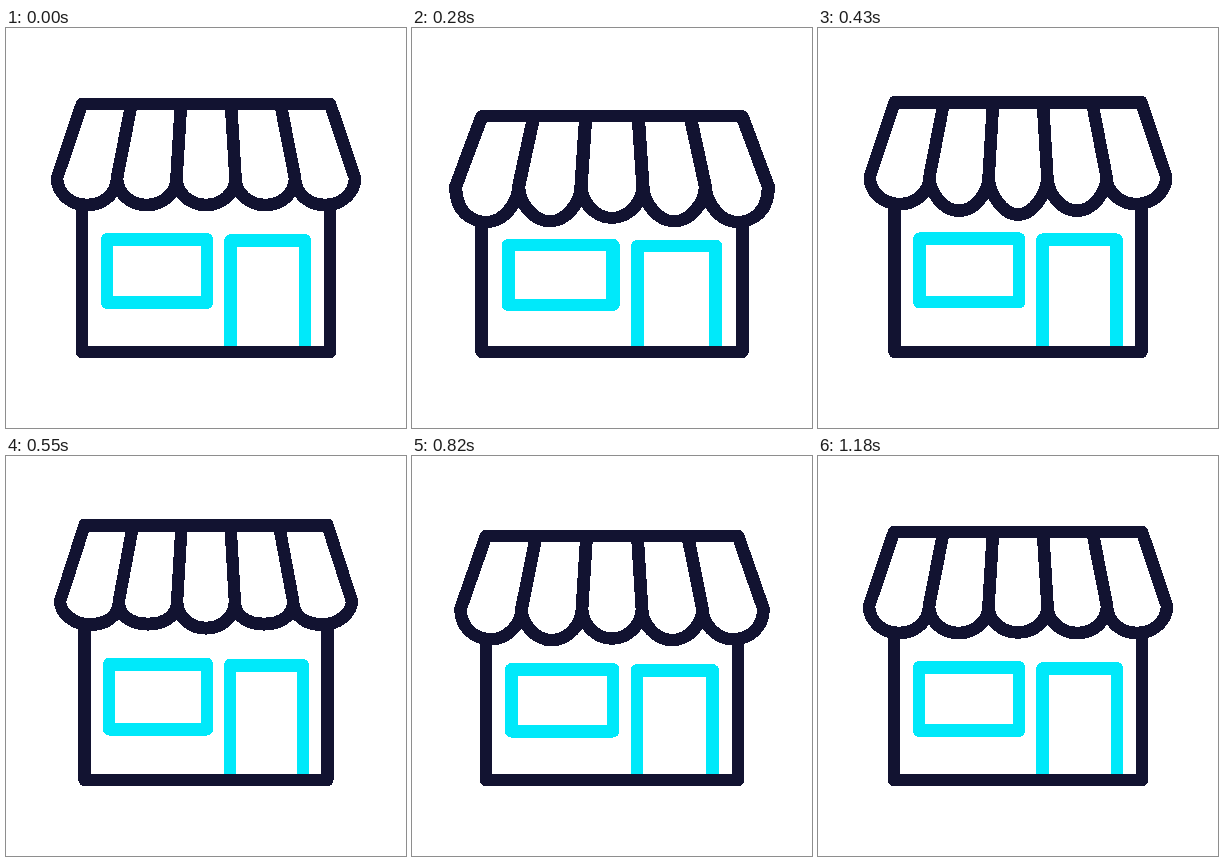
Recreate the animation shown at these times as an HTML page. Size 400x400 px, loop 1.21 s.

```html
<!DOCTYPE html>
<html lang="en">
<head>
<meta charset="utf-8">
<title>Bouncing shop</title>
<style>
  html, body { margin: 0; width: 100%; height: 100%; overflow: hidden; background: #fff; }
  svg { display: block; width: 100%; height: 100%; shape-rendering: crispEdges; }
  path { stroke-width: 12.6; stroke-linejoin: round; fill: none; }
  .navy { stroke: #121331; }
  .cyan { stroke: #00e9fa; }
  #awning { fill: #fff; }
</style>
</head>
<body>
<svg viewBox="0 0 400 400">
  <g id="shop">
    <path class="cyan" d="M101 211.5H201V274.5H101Z"/>
    <path class="cyan" d="M224.5 320V212.5H299V320"/>
    <path class="navy" d="M76 172V324H324V172"/>
    <path class="navy" id="awning"/>
  </g>
</svg>
<script>
  const LOOP = 1210, HOLD = 100, STEP = 30, LAG = 56;
  const GROUND = 324, ROOF = 76, EDGE = 150, HEM = 177, CURVE = 15;

  // Seam positions along the roof and along the lower edge
  const tops = [76, 125.5, 175, 225, 274.5, 324];
  const ends = [51, 111, 170.5, 229.5, 289, 349];

  // [time, value]; positive squash is wider and lower
  const squash = [[80, 0], [255, .051], [525, -.029], [765, .019], [1000, 0]];
  const sag = [[80, 0], [230, 9.5], [310, 10.5], [505, -4.8], [780, 4.8], [945, -2.2], [1130, 0]];

  const shop = document.getElementById('shop');
  const awning = document.getElementById('awning');

  function sample(keys, t) {
    if (t <= keys[0][0]) return keys[0][1];
    for (let i = 1; i < keys.length; i++) {
      const [t0, a] = keys[i - 1], [t1, b] = keys[i];
      if (t < t1) return a + (b - a) * (1 - Math.cos(Math.PI * (t - t0) / (t1 - t0))) / 2;
    }
    return keys[keys.length - 1][1];
  }

  // The free outer sides of the awning bulge along with the sag
  function stripe(i, drop) {
    const l = ends[i], r = ends[i + 1], mid = (l + r) / 2;
    const h = (r - l) * .276, low = HEM + drop;
    const left = EDGE + CURVE + (i === 0 ? drop : 0);
    const right = EDGE + CURVE + (i === 4 ? drop : 0);
    return `M${tops[i]} ${ROOF}L${l} ${EDGE}` +
      `C${l} ${left} ${mid - h} ${low} ${mid} ${low}` +
      `S${r} ${right} ${r} ${EDGE}L${tops[i + 1]} ${ROOF}Z`;
  }

  function draw(t) {
    const s = sample(squash, t);
    const sx = 1 + (s < 0 ? s * .75 : s), sy = 1 - s;
    shop.setAttribute('transform',
      `translate(200 ${GROUND}) scale(${sx} ${sy}) translate(-200 ${-GROUND})`);

    // The sag travels from the outer scallops to the middle one
    let d = '';
    for (let i = 0; i < 5; i++) {
      const delay = LAG * (2 - Math.abs(i - 2));
      d += stripe(i, sample(sag, t - delay));
    }
    awning.setAttribute('d', d);
  }

  function tick() {
    const t = performance.now() % LOOP;
    draw(t < HOLD ? 0 : HOLD + Math.floor((t - HOLD) / STEP) * STEP);
    requestAnimationFrame(tick);
  }
  tick();
</script>
</body>
</html>
```
